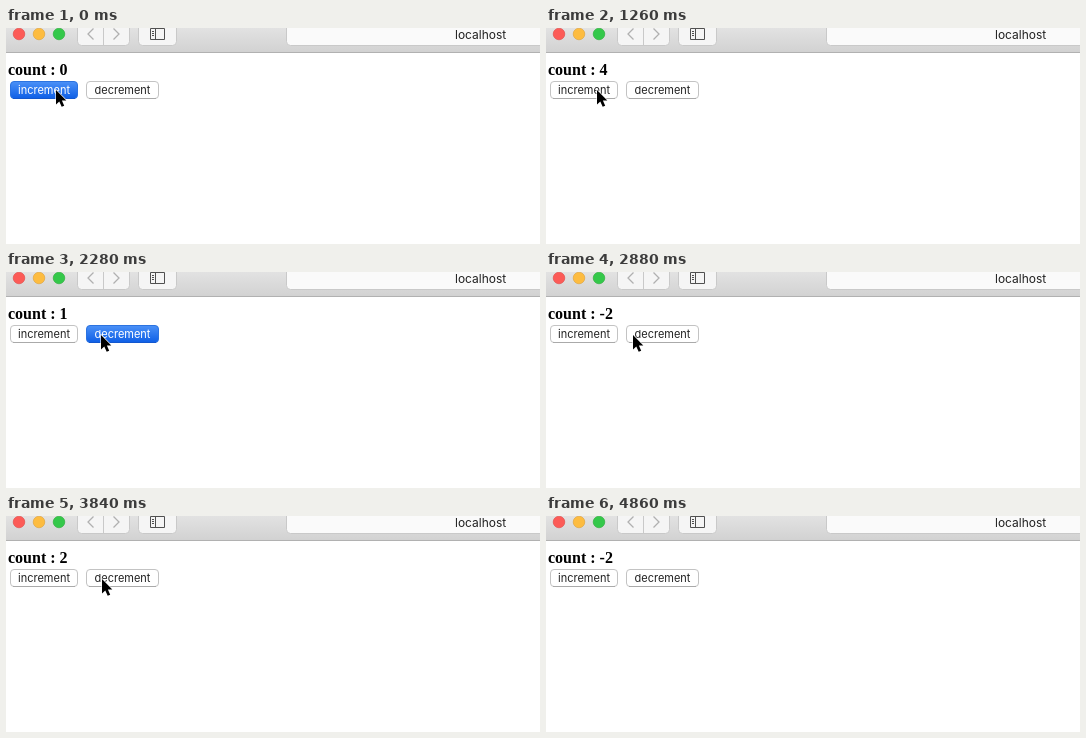
These frames come from a looping animation (534 px wide and 216 px high, 5.04 s). An HTML page:

```html
<!DOCTYPE html>
<html lang="en">
<head>
<meta charset="utf-8">
<title>Counter</title>
<style>
  html, body { margin: 0; width: 100%; height: 100%; overflow: hidden; background: #fff; }
  svg { display: block; }
  text { font-family: Inter, sans-serif; fill: #222; }
  .count { font: bold 16px "Liberation Serif", serif; fill: #000; white-space: pre; }
  .button text { font-size: 11px; text-anchor: middle; }
  .button rect { fill: #fff; stroke: #c3c3c3; }
  .button .edge { fill: none; stroke: #aaa; }
  .pressed rect { fill: url(#blue); stroke: #2c73e0; }
  .pressed .edge { stroke: #1257cf; }
  .pressed text { fill: #fff; }
  .tool { fill: #f5f5f5; stroke: #c9c9c9; }
  .chevron { fill: none; stroke: #b0b0b0; stroke-width: 1.3; }
  .icon { fill: none; stroke: #505050; }
</style>
</head>
<body>
<svg width="534" height="216" viewBox="0 0 534 216">
  <defs>
    <linearGradient id="bar" x2="0" y2="1">
      <stop stop-color="#e2e2e2"/><stop offset="1" stop-color="#d2d2d2"/>
    </linearGradient>
    <linearGradient id="blue" x2="0" y2="1">
      <stop stop-color="#4b91f7"/><stop offset="1" stop-color="#0e5fe6"/>
    </linearGradient>
  </defs>

  <rect width="534" height="24" fill="url(#bar)"/>
  <rect y="24" width="534" height="1" fill="#b1b1b1"/>
  <g stroke-width=".6">
    <circle cx="13" cy="6" r="5.8" fill="#fc5b57" stroke="#df4744"/>
    <circle cx="33" cy="6" r="5.8" fill="#fdbc40" stroke="#dea034"/>
    <circle cx="53" cy="6" r="5.8" fill="#34c84a" stroke="#27aa35"/>
  </g>
  <g class="tool">
    <rect x="71.5" y="-8.5" width="52" height="26" rx="4"/>
    <path d="M97.500 0V17"/>
    <rect x="132.500" y="-8.500" width="38" height="26" rx="4"/>
    <rect x="280.500" y="-8.500" width="270" height="26" rx="4" fill="#fafafa"/>
  </g>
  <path class="chevron" d="M87.500 .5L82 6L87.500 11.500M107.500 .5L113 6L107.500 11.500"/>
  <path class="icon" d="M144.500 .5H158.500V11.500H144.500ZM149.500 .5V11.500M146 3.500H148M146 5.500H148M146 7.500H148"/>
  <text x="449" y="11" font-size="12">localhost</text>

  <text class="count" x="2" y="47"></text>
  <g class="button">
    <rect x="4.500" y="53.500" width="67" height="17" rx="3.500"/>
    <path class="edge" d="M7 70.500H69"/>
    <text x="38" y="66">increment</text>
  </g>
  <g class="button">
    <rect x="80.500" y="53.500" width="72" height="17" rx="3.500"/>
    <path class="edge" d="M83 70.500H150"/>
    <text x="116.500" y="66">decrement</text>
  </g>
  <path id="cursor" d="M0 0V14.500L3.300 11.400L5.700 16.800L8.200 15.700L5.900 10.500H10.300Z"
        stroke="#fff" stroke-width="1.200" paint-order="stroke"/>
</svg>
<script>
const LOOP = 5040, STEP = 60;

// press time, release time, change of the count
const clicks = [
  [0, 120, 1], [420, 540, 1], [780, 900, 1], [1080, 1200, 1],
  [1800, 1860, -1], [1980, 2040, -1], [2100, 2160, -1],
  [2280, 2340, -1], [2460, 2520, -1], [2640, 2700, -1],
  [3060, 3180, 1], [3240, 3300, 1], [3360, 3420, 1], [3480, 3540, 1],
  [3900, 3960, -1], [4080, 4140, -1], [4260, 4320, -1], [4440, 4500, -1]
];

// time, x, y of the pointer tip
const path = [
  [0, 50, 62], [420, 50, 62], [540, 51, 62], [1260, 51, 62], [1440, 82, 64],
  [1560, 95, 63], [2820, 95, 63], [2880, 87, 63], [2940, 66, 64], [3000, 51, 62],
  [3540, 51, 62], [3660, 131, 64], [3780, 96, 63], [4500, 96, 63],
  [4620, 80, 112], [4740, 59, 185], [4800, 59, 196], [4860, 59, 230]
];

const label = document.querySelector(".count");
const [increment, decrement] = document.querySelectorAll(".button");
const cursor = document.getElementById("cursor");

function pointerAt(t) {
  const next = path.findIndex(point => point[0] > t);
  if (next < 0) return path.at(-1).slice(1);
  const [t0, x0, y0] = path[next - 1], [t1, x1, y1] = path[next];
  const k = (t - t0) / (t1 - t0);
  return [x0 + (x1 - x0) * k, y0 + (y1 - y0) * k];
}

function draw(now) {
  const t = Math.floor(now % LOOP / STEP) * STEP;
  const count = clicks.reduce((sum, [, up, change]) => sum + (t >= up ? change : 0), 0);
  const held = clicks.find(([down, up]) => t >= down && t < up);
  label.textContent = `count : ${count}`;
  increment.classList.toggle("pressed", held?.[2] === 1);
  decrement.classList.toggle("pressed", held?.[2] === -1);
  cursor.setAttribute("transform", `translate(${pointerAt(t)})`);
}

const start = performance.now();
function tick() {
  draw(performance.now() - start);
  requestAnimationFrame(tick);
}
tick();
</script>
</body>
</html>
```
